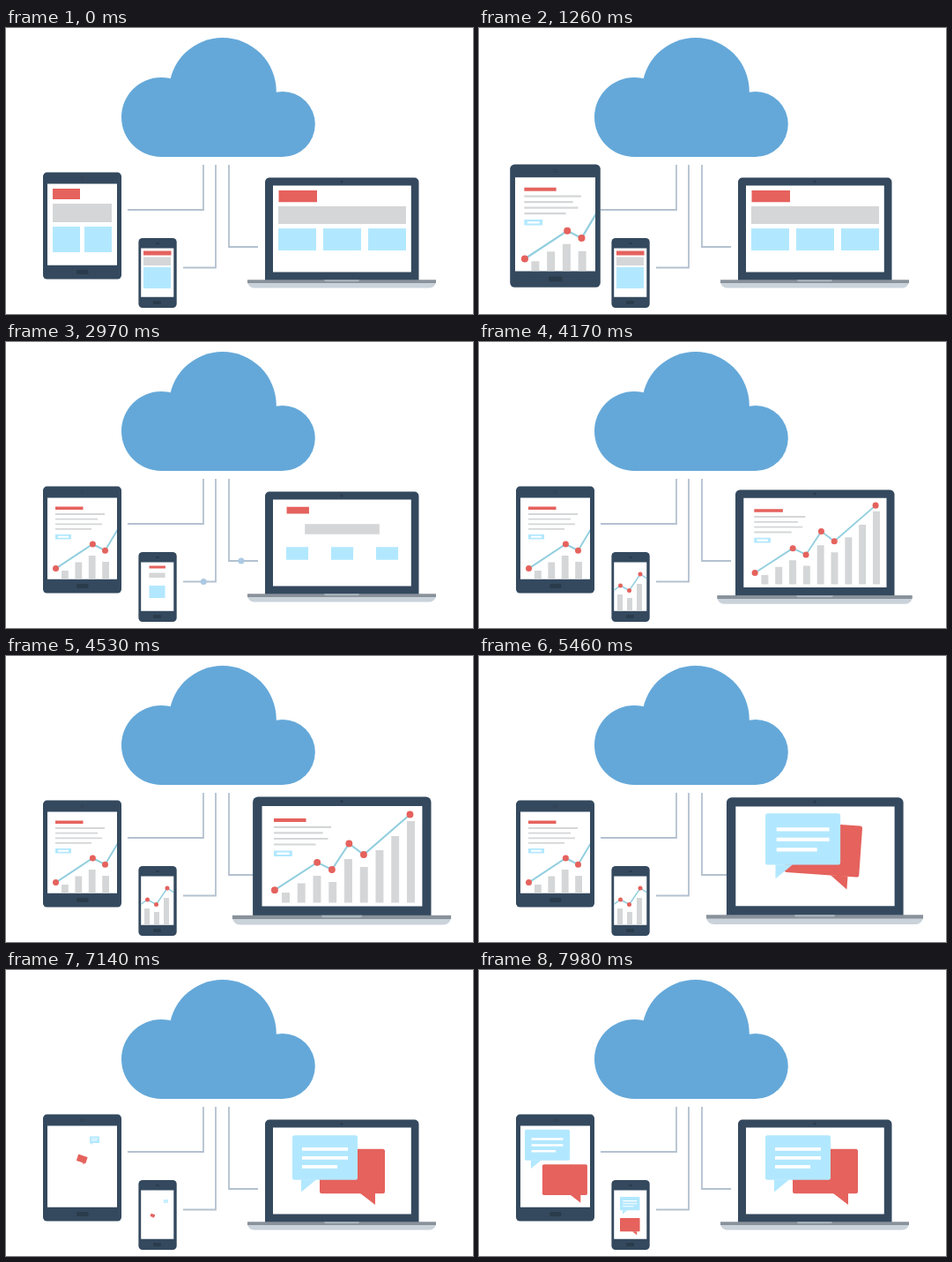
An HTML page with a canvas for the animation above (8 s loop, 530 by 324 pixels).

```html
<!DOCTYPE html>
<html lang="en">
<head>
<meta charset="utf-8">
<title>Devices in sync</title>
<style>
  html, body { margin: 0; width: 100%; height: 100%; overflow: hidden; background: #fff; }
  canvas { display: block; width: 530px; height: 324px; }
</style>
</head>
<body>
<canvas id="stage"></canvas>
<script>
const LOOP = 8000, W = 530, H = 324;
const RED = '#e5625d', GREY = '#d4d6d7', SKY = '#b2e8ff', NAVY = '#34495e',
      DARK = '#2a3b4c', CLOUD = '#64a8d9', WIRE = '#b4c1d0', LINE = '#92cfdf';

const canvas = document.getElementById('stage');
const ctx = canvas.getContext('2d');
const dpr = window.devicePixelRatio || 1;
canvas.width = W * dpr;
canvas.height = H * dpr;

// Timing helpers
const clamp = v => Math.max(0, Math.min(1, v));
const span = (t, from, length) => clamp((t - from) / length);
const easeOut = x => 1 - (1 - x) ** 3;
const easeInOut = x => x * x * (3 - 2 * x);
const backIn = (x, c) => (c + 1) * x ** 3 - c * x * x;
const backOut = (x, c) => 1 - backIn(1 - x, c);

// Drawing helpers; boxes are given by their edges
function box(color, l, t, r, b, radius = 0) {
  ctx.fillStyle = color;
  ctx.beginPath();
  ctx.roundRect(l, t, r - l, b - t, radius);
  ctx.fill();
}

function disc(color, x, y, r) {
  ctx.fillStyle = color;
  ctx.beginPath();
  ctx.arc(x, y, Math.max(0, r), 0, Math.PI * 2);
  ctx.fill();
}

function shape(color, points) {
  ctx.fillStyle = color;
  ctx.beginPath();
  points.forEach(p => ctx.lineTo(...p));
  ctx.fill();
}

function stroke(color, width, points) {
  ctx.strokeStyle = color;
  ctx.lineWidth = width;
  ctx.beginPath();
  points.forEach(p => ctx.lineTo(...p));
  ctx.stroke();
}

function scaled(x, y, s, draw) {
  ctx.save();
  ctx.translate(x, y);
  ctx.scale(s, s);
  ctx.translate(-x, -y);
  draw();
  ctx.restore();
}

// Page layout made of blocks, each shrinking about its own centre
function layout(blocks, k) {
  for (const [color, l, t, r, b] of blocks)
    scaled((l + r) / 2, (t + b) / 2, k, () => box(color, l, t, r, b));
}

function textBlock(x, y, k) {
  box(RED, x, y, x + 31.5 * k, y + 3.4);
  [56, 48, 53, 41].forEach((w, i) => {
    const top = y + 7.6 + i * 5.65;
    box(GREY, x, top, x + w * k, top + 1.8);
  });
  scaled(x + 9, y + 34.3, k, () => {
    box(SKY, x, y + 31.5, x + 18, y + 37);
    box('#fff', x + 3, y + 33.3, x + 15, y + 35.3);
  });
}

function chart(c, screen, k) {
  const [left, , right] = screen;
  c.tops.forEach((top, i) => {
    const x = c.x + i * c.step;
    box(GREY, x, c.base - (c.base - top) * k, x + c.width, c.base);
  });
  ctx.save();
  ctx.beginPath();
  ctx.rect(left, 0, (right - left) * k, H);
  ctx.clip();
  stroke(LINE, c.weight, c.points);
  ctx.restore();
  for (const [x, y] of c.points) {
    if (x <= left || x >= right) continue;
    disc(RED, x, y, c.dot * span(k, (x - left) / (right - left) * 0.8, 0.2));
  }
  if (c.text) textBlock(...c.text, k);
}

function bubble(color, tail, lines) {
  box(color, -37, -25.3, 37, 25.3, 2.5);
  shape(color, tail);
  lines.forEach((w, i) => box('#fff', -26, -11.5 + i * 10, -26 + w, -7.8 + i * 10));
}

// Two speech bubbles that pop up close together and drift apart
function chat(c, ms) {
  const size = clamp(ms / 400) < 1 ? backOut(clamp(ms / 400), 1.4) : 1;
  const rest = (1 - clamp(ms / 850)) ** 2;
  const place = (x, y, dx, dy, turn, draw) => {
    ctx.save();
    ctx.translate(x + dx * rest * c.size, y + dy * rest * c.size);
    ctx.rotate(turn * rest);
    ctx.scale(c.size * size, c.size * size);
    draw();
    ctx.restore();
  };
  place(...c.red, -17, -36, 0.34, () =>
    bubble(RED, [[9, 25], [26, 38], [26, 25]], []));
  place(...c.blue, 35, -9, 0, () =>
    bubble(SKY, [[-27, 25], [-27, 39], [-10, 25]], [52, 52, 40]));
}

const tablet = {
  center: [86.5, 224],
  screen: [47, 176.5, 126, 268.7],
  body() {
    box(NAVY, 42, 163.6, 131, 284.5, 4.5);
    disc(DARK, 86.5, 170, 1.8);
    disc('#53687d', 86.5, 170, 0.7);
    box(DARK, 80, 274, 93.5, 279, 1.5);
  },
  blocks: [
    [RED, 53, 182, 84, 194], [GREY, 53, 199, 120, 220],
    [SKY, 53, 225, 84, 254], [SKY, 89, 225, 120, 254]
  ],
  chart: {
    x: 63, step: 15.4, width: 7.8, base: 268.7, tops: [259, 249.4, 242, 249],
    points: [[56.5, 256.6], [98.4, 229], [112.5, 236.2], [127, 212]],
    weight: 2, dot: 3.5, text: [56, 186.5]
  },
  chat: { size: 0.69, blue: [77.5, 198.2], red: [97.4, 237.6] }
};

const phone = {
  center: [172, 277.5],
  screen: [153.2, 249.5, 190.3, 304.7],
  body() {
    box(NAVY, 150.4, 238, 193.7, 317, 4.5);
    box(DARK, 170, 243, 174, 245, 1);
    box(DARK, 167, 309, 176, 313, 1.2);
  },
  blocks: [
    [RED, 156, 252.5, 187.5, 257.5], [GREY, 156, 259.5, 187, 269], [SKY, 156, 271, 187, 295]
  ],
  chart: {
    x: 157, step: 11, width: 6, base: 304.7, tops: [286, 290, 274],
    points: [[152, 282], [160.5, 276], [170.5, 281.5], [183, 263], [192, 269]],
    weight: 1.5, dot: 2.5
  },
  chat: { size: 0.305, blue: [171.2, 264.6], red: [171.3, 288.6] }
};

const laptop = {
  center: [381, 232],
  screen: [303, 178.5, 459.8, 276.5],
  body() {
    box(NAVY, 294, 169.6, 468.5, 287, [5, 5, 0, 0]);
    disc(DARK, 381, 174, 1.5);
    box('#cad2da', 274, 287, 488, 294.6, [0, 0, 11, 11]);
    box('#89929b', 274, 285.2, 488, 289);
    box('#a9b3bd', 361, 285.2, 401, 287.3, [0, 0, 2, 2]);
  },
  blocks: [
    [RED, 309.5, 184, 353, 197.3], [GREY, 309, 202, 454, 222],
    [SKY, 309, 227, 352, 252], [SKY, 360, 227, 403, 252], [SKY, 411, 227, 454, 252]
  ],
  chart: {
    x: 322.4, step: 15.3, width: 7.7, base: 273,
    tops: [263, 254, 246.7, 252.7, 230.3, 238, 221.7, 207.9, 193.2],
    points: [[315.4, 260.6], [357, 233.6], [371.4, 240.6], [388.2, 215.2], [402.5, 226], [447.8, 186.7]],
    weight: 1.8, dot: 3.4, text: [314.6, 190.6]
  },
  chat: { size: 1, blue: [362, 212.5], red: [393, 228] }
};

const wires = {
  tablet: [[224, 155], [224, 206], [138, 206]],
  phone: [[238, 155], [238, 271.5], [201, 271.5]],
  laptop: [[253, 155], [253, 248], [286, 248]]
};

// Start of the chart and of the chat on each screen
const swaps = new Map([[tablet, [740, 7120]], [phone, [3060, 7120]], [laptop, [3060, 5000]]]);
const OUT = 160, GROW = 440;

function drawDevice(d, t, s) {
  const [toChart, toChat] = swaps.get(d);
  const [l, top, r, b] = d.screen;
  scaled(...d.center, s, () => {
    d.body();
    box('#fff', l, top, r, b);
    ctx.beginPath();
    ctx.rect(l, top, r - l, b - top);
    ctx.clip();
    if (t < toChart) layout(d.blocks, 1 - easeInOut(span(t, toChart - OUT, OUT)));
    else if (t < toChat) {
      const leave = easeInOut(span(t, toChat - OUT, OUT));
      chart(d.chart, d.screen, easeInOut(span(t, toChart, GROW)) * (1 - leave));
    } else chat(d.chat, t - toChat);
  });
}

function pulse(path, progress) {
  if (progress <= 0 || progress >= 1) return;
  const [a, b, c] = path;
  const first = Math.abs(b[1] - a[1]), second = Math.abs(c[0] - b[0]);
  const run = progress * (first + second);
  const x = run < first ? a[0] : a[0] + Math.sign(c[0] - b[0]) * (run - first);
  disc('#acc9e3', x, a[1] + Math.min(run, first), 3.5);
}

function drawCloud(t) {
  const hop = start => Math.sin(Math.PI * span(t, start, 495));
  ctx.save();
  ctx.translate(0, -10 * (hop(2200) + hop(6187)));
  disc(CLOUD, 176, 101, 45);
  disc(CLOUD, 245.8, 72, 61);
  disc(CLOUD, 313.8, 109, 37);
  box(CLOUD, 176, 96, 313.8, 146);
  ctx.restore();
}

function tabletScale(t) {
  const up = easeOut(span(t, 350, 340));
  return 1 + 0.152 * up * (1 - backIn(span(t, 1500, 370), 2.9));
}

function laptopScale(t) {
  const up = backOut(span(t, 4150, 470), 2.5);
  return 1 + 0.15 * up * (1 - easeInOut(span(t, 5740, 260)));
}

function draw(t) {
  ctx.setTransform(dpr, 0, 0, dpr, 0, 0);
  ctx.fillStyle = '#fff';
  ctx.fillRect(0, 0, W, H);
  Object.values(wires).forEach(path => stroke(WIRE, 1.8, path));

  pulse(wires.tablet, 1 - span(t, 1860, 350));
  pulse(wires.phone, span(t, 2640, 390));
  pulse(wires.laptop, span(t, 2640, 390));
  pulse(wires.laptop, 1 - span(t, 5860, 340));
  pulse(wires.tablet, span(t, 6640, 390));
  pulse(wires.phone, span(t, 6640, 390));

  drawCloud(t);
  drawDevice(tablet, t, tabletScale(t));
  drawDevice(phone, t, 1);
  drawDevice(laptop, t, laptopScale(t));
}

const begin = performance.now();
function tick() {
  draw((performance.now() - begin) % LOOP);
  requestAnimationFrame(tick);
}
tick();
</script>
</body>
</html>
```
